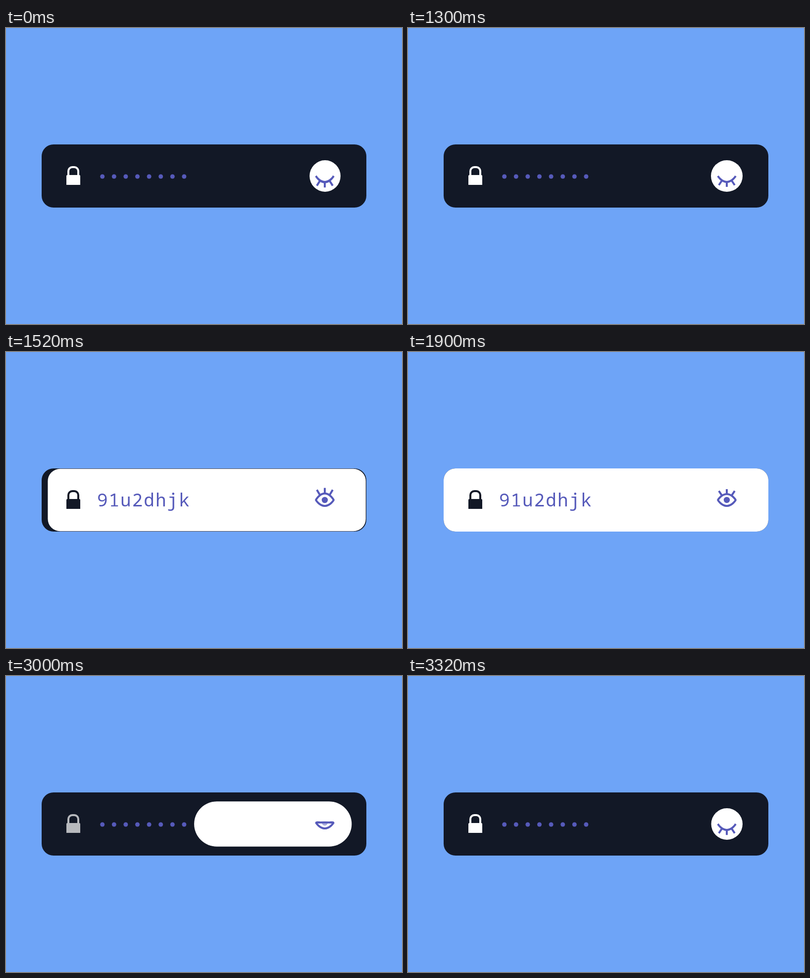
Write an HTML page that moves like this. It is 800 px wide and 600 px high and loops after 3340 ms.

```html
<!DOCTYPE html>
<html lang="en">
<head>
<meta charset="utf-8">
<title>Password reveal</title>
<style>
  html, body { margin: 0; height: 100%; overflow: hidden; background: #6ea4f7; }
  svg { display: block; width: 100%; height: 100%; }
  text { font: 36px "Noto Sans Mono", monospace; letter-spacing: 2px; fill: #565aba; }
  .line { fill: none; stroke-width: 4; }
</style>
</head>
<body>
<svg viewBox="0 0 800 600">
  <defs>
    <clipPath id="panelClip"><use href="#panel"/></clipPath>
    <clipPath id="eyeClip"><path id="eyeShape"/></clipPath>
  </defs>
  <rect x="72" y="236" width="656" height="128" rx="24" fill="#121826"/>
  <g id="dots" fill="#565aba"></g>
  <rect id="panel" fill="#fff"/>
  <text x="183.9" y="312.5" clip-path="url(#panelClip)">91u2dhjk</text>
  <g id="lock">
    <path d="M122 318V300a2 2 0 0 1 2-2h24a2 2 0 0 1 2 2v18z" stroke="none"/>
    <path class="line" d="M126 299V290a8 8 0 0 1 8-8h4a8 8 0 0 1 8 8v9"/>
  </g>
  <g id="eye" stroke="#565aba">
    <g clip-path="url(#eyeClip)"><circle id="pupil" r="6.2" fill="#565aba" stroke="none"/></g>
    <path id="lids" class="line" stroke-linejoin="bevel"/>
    <path id="lashes" class="line"/>
  </g>
</svg>
<script>
const LOOP = 3340, OPEN_AT = 1320, CLOSE_AT = 2920;
const SETTLED = 340; // time already spent closing when the loop begins
const DARK = [18, 24, 38];

const $ = id => document.getElementById(id);
const set = (id, attrs) => {
  for (const key in attrs) $(id).setAttribute(key, attrs[key]);
};
const mix = (a, b, k) => a + (b - a) * k;
const clamp = v => Math.min(1, Math.max(0, v));

// Damped spring from 0 to 1; t in seconds
const spring = (t, decay, freq) =>
  1 - Math.exp(-decay * t) * (Math.cos(freq * t) + decay / freq * Math.sin(freq * t));

for (let i = 0; i < 8; i++) {
  const dot = document.createElementNS("http://www.w3.org/2000/svg", "circle");
  dot.setAttribute("cx", 194.7 + 23.6 * i);
  dot.setAttribute("cy", 301);
  dot.setAttribute("r", 4.5);
  $("dots").append(dot);
}

function drawPanel(open) {
  const x = mix(612, 72, open), y = mix(268, 236, open);
  const width = mix(64, 656, open), height = mix(64, 128, open);
  set("panel", { x, y, width, height, rx: Math.min(mix(64, 24, open), height / 2) });
}

// The upper lid and its lashes flip over the line y = 0
function drawEye(open) {
  const flip = mix(-1, 1, open), top = -12 * flip;
  const lids = `M-18 0C-18 0-11 ${top} 0 ${top}S18 0 18 0S11 12 0 12S-18 0-18 0Z`;
  const side = x => `M${x * 16} ${-18.5 * flip}L${x * 10} ${-9.5 * flip}`;
  const lift = 12 * clamp(open) * (1 - clamp(open));
  set("eye", { transform: `translate(644 ${300 - lift})` });
  set("eyeShape", { d: lids });
  set("lids", { d: lids });
  set("lashes", { d: `M0 ${-22 * flip}V${-12 * flip}${side(-1)}${side(1)}` });
  set("pupil", { opacity: clamp(open) });
}

function drawLock(white) {
  const color = `rgb(${DARK.map(c => Math.round(mix(c, 255, white)))})`;
  set("lock", { fill: color, stroke: color });
}

function frame(now) {
  const t = now % LOOP;
  const opening = t >= OPEN_AT && t < CLOSE_AT;
  const ms = opening ? t - OPEN_AT : t < OPEN_AT ? t + SETTLED : t - CLOSE_AT;
  const toward = k => opening ? k : 1 - k;
  drawPanel(toward(spring(ms / 1000, 19.3, 10.4)));
  drawEye(toward(spring(ms / 1000, 10.4, 13)));
  drawLock(1 - toward(1 - (1 - clamp(ms / 180)) ** 2));
  requestAnimationFrame(frame);
}
frame(performance.now());
</script>
</body>
</html>
```
